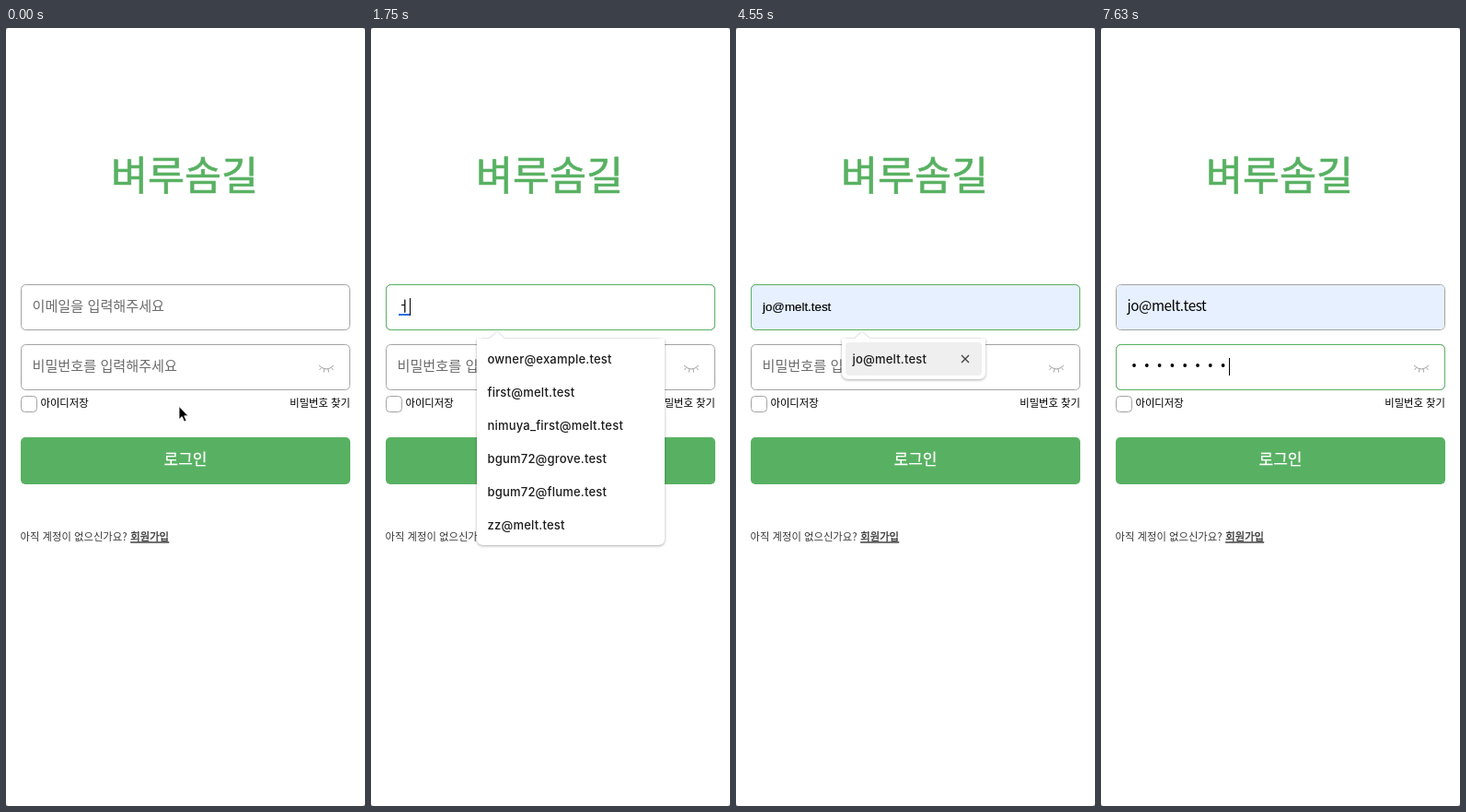
An HTML page for the animation above (8 s loop, 390 px wide and 844 px high).

```html
<!DOCTYPE html>
<html lang="ko">
<head>
<meta charset="utf-8">
<title>로그인</title>
<style>
  html, body { margin: 0; width: 100%; height: 100%; overflow: hidden; background: #8a8a8a; }
  svg { display: block; width: 390px; height: 844px; border-radius: 3px; background: #fff; }
  text { font-family: "Noto Sans CJK KR", "Noto Sans CJK", sans-serif; white-space: pre; }
  .logo { font-size: 43.5px; fill: #58b162; stroke: #58b162; stroke-width: .7; stroke-linejoin: round; }
  .hint { font-size: 15.15px; fill: #6c6c6c; }
  .small { font-size: 11.35px; }
  .note { fill: #3a3a3a; }
  .link { stroke: #3a3a3a; stroke-width: .35; text-decoration: underline; }
  .login { font-size: 17px; fill: #fff; stroke: #fff; stroke-width: .25; }
  .typed { font-size: 15.15px; letter-spacing: -.4px; }
  .preview { font: 13.33px "Liberation Sans", Arial, sans-serif; stroke: #000; stroke-width: .15; }
  .list text { font: 500 13px Inter, sans-serif; letter-spacing: .2px; fill: #1b1b1b; }
  .box { fill: #fff; stroke: #a3a3a3; }
  .focus { fill: none; stroke: #58b162; }
  .line { fill: none; stroke: #a3a3a3; }
  .panel { filter: drop-shadow(0 1px 1.5px rgba(0, 0, 0, .32)); }
</style>
</head>
<body>
<svg viewBox="0 0 390 844">
  <text class="logo" x="114" y="175.5">벼루솜길</text>

  <rect class="box" x="16.5" y="278.5" width="357" height="49" rx="5"/>
  <rect data-on="4550-8000" x="17" y="279" width="356" height="48" rx="4.5" fill="#e6f0ff"/>
  <rect class="focus" data-on="880-5390" x="16.5" y="278.5" width="357" height="49" rx="5"/>
  <text class="hint" data-on="0-1750 2660-3150" x="28.5" y="306.5">이메일을 입력해주세요</text>
  <g data-on="1750-2660">
    <text class="typed" x="28.5" y="306.5">ㅓ</text>
    <rect x="30" y="310" width="13" height="2" fill="#2c6fe0"/>
  </g>
  <text class="typed" data-on="3150-3290" x="28.5" y="306.5">j</text>
  <text class="typed" data-on="3290-4550" x="28.5" y="306.5">jo</text>
  <text class="preview" data-on="4550-4900" x="29" y="307">jo@melt.test</text>
  <text class="typed" data-on="4900-8000" x="28.5" y="306.5">jo@melt.test</text>

  <rect class="box" x="16.5" y="343.5" width="357" height="49" rx="5"/>
  <rect class="focus" data-on="5390-8000" x="16.5" y="343.5" width="357" height="49" rx="5"/>
  <text class="hint" data-on="0-6020" x="28.5" y="371.5">비밀번호를 입력해주세요</text>
  <g id="dots"></g>
  <path class="line" d="M340 366Q348 374 356 366M342.5 368.5l-2 2.5M346 370l-.7 3.5M350 370l.7 3.5M353.5 368.5l2 2.5"/>

  <rect class="box" x="16.5" y="399.5" width="17" height="17" rx="4"/>
  <text class="small" x="37.5" y="410.7">아이디저장</text>
  <text class="small" x="374" y="410.7" text-anchor="end">비밀번호 찾기</text>
  <rect x="16" y="444" width="358" height="51" rx="5" fill="#58b162"/>
  <text class="login" x="195" y="474.3" text-anchor="middle">로그인</text>
  <text class="small note" x="15.5" y="556.4">아직 계정이 없으신가요?</text>
  <text class="small note link" x="135.3" y="556.4">회원가입</text>

  <g class="list" id="all" data-on="980-1890"></g>
  <g class="list" id="match" data-on="3150-4900"></g>

  <rect id="caret" width="1"/>
  <path id="arrow" data-on="0-70" d="M188 410.5V424.5L191.2 421.6L193.6 427L196 426L193.7 420.8H198Z" stroke="#fff" stroke-width=".8"/>
  <circle id="touch" data-on="70-1750" r="9.5" fill="#333" fill-opacity=".65"/>
</svg>
<script>
  const LOOP = 8000;
  const $ = id => document.getElementById(id);
  const mix = (a, b, k) => a + (b - a) * k;
  const clamp = v => Math.max(0, Math.min(1, v));

  const panel = (width, mails, extra = '') => {
    const bottom = 345 + 36 * mails.length;
    const rows = mails.map((m, i) => `<text x="126.5" y="${364 + 36 * i}">${m}</text>`).join('');
    return `<path class="panel" fill="#fff" d="M115 337H129L137 329.5L145 337H${115 + width}V${bottom - 7}
      q0 7 -7 7H122q-7 0 -7 -7Z"/><path d="M120 336.5H128.5L137 329.5L145.5 336.5H${110 + width}"
      fill="none" stroke="#e6e6e6"/>${extra}${rows}`;
  };
  $('all').innerHTML = panel(204, ['owner@example.test', 'first@melt.test',
    'nimuya_first@melt.test', 'bgum72@grove.test', 'bgum72@flume.test', 'zz@melt.test']);
  $('match').innerHTML = panel(156, ['jo@melt.test'], `<g data-on="4550-4900">
    <rect x="119" y="341" width="148" height="36" rx="4" fill="#efefef"/>
    <path d="M245 355l8 8m0-8l-8 8" stroke="#444" stroke-width="1.4"/></g>`);

  const STEP = 13.8;
  const keys = [6020, 6300, 6510, 6720, 7000, 7210, 7350, 7630];
  $('dots').innerHTML = keys.map((t, i) =>
    `<circle data-on="${t}-${LOOP}" cx="${36 + STEP * i}" cy="366" r="1.9"/>`).join('');

  // Caret stays: start, end, x, y
  const carets = [
    [880, 1470, 29, 294], [1750, 2310, 42, 293], [2660, 3150, 29, 293],
    [3150, 3290, 32, 293], [3290, 3850, 41, 293], [4340, 4550, 41, 293],
    [4900, 5390, 115, 293], [5390, 5880, 29, 359],
    ...keys.map((t, i) => [t, keys[i + 1] || LOOP, Math.round(28.4 + STEP * (i + 1)), 358])
  ];

  const timed = [...document.querySelectorAll('[data-on]')].map(el => ({
    el, spans: el.dataset.on.split(' ').map(s => s.split('-').map(Number))
  }));

  function draw(t) {
    for (const { el, spans } of timed)
      el.style.display = spans.some(([a, b]) => t >= a && t < b) ? '' : 'none';

    const c = carets.find(([a, b]) => t >= a && t < b);
    $('caret').setAttribute('height', c ? 19 : 0);
    if (c) {
      $('caret').setAttribute('x', c[2]);
      $('caret').setAttribute('y', c[3]);
    }

    $('all').style.opacity = 1 - clamp((t - 1790) / 100);

    const go = clamp(t / 460), ease = go * go * (3 - 2 * go);
    const back = clamp((t - 460) / 170);
    $('touch').setAttribute('cx', mix(mix(190, 117, ease), 129, back));
    $('touch').setAttribute('cy', mix(mix(414, 303, ease), 300, back));
  }

  const start = performance.now();
  function tick() {
    draw((performance.now() - start) % LOOP);
    requestAnimationFrame(tick);
  }
  draw(0);
  tick();
</script>
</body>
</html>
```
